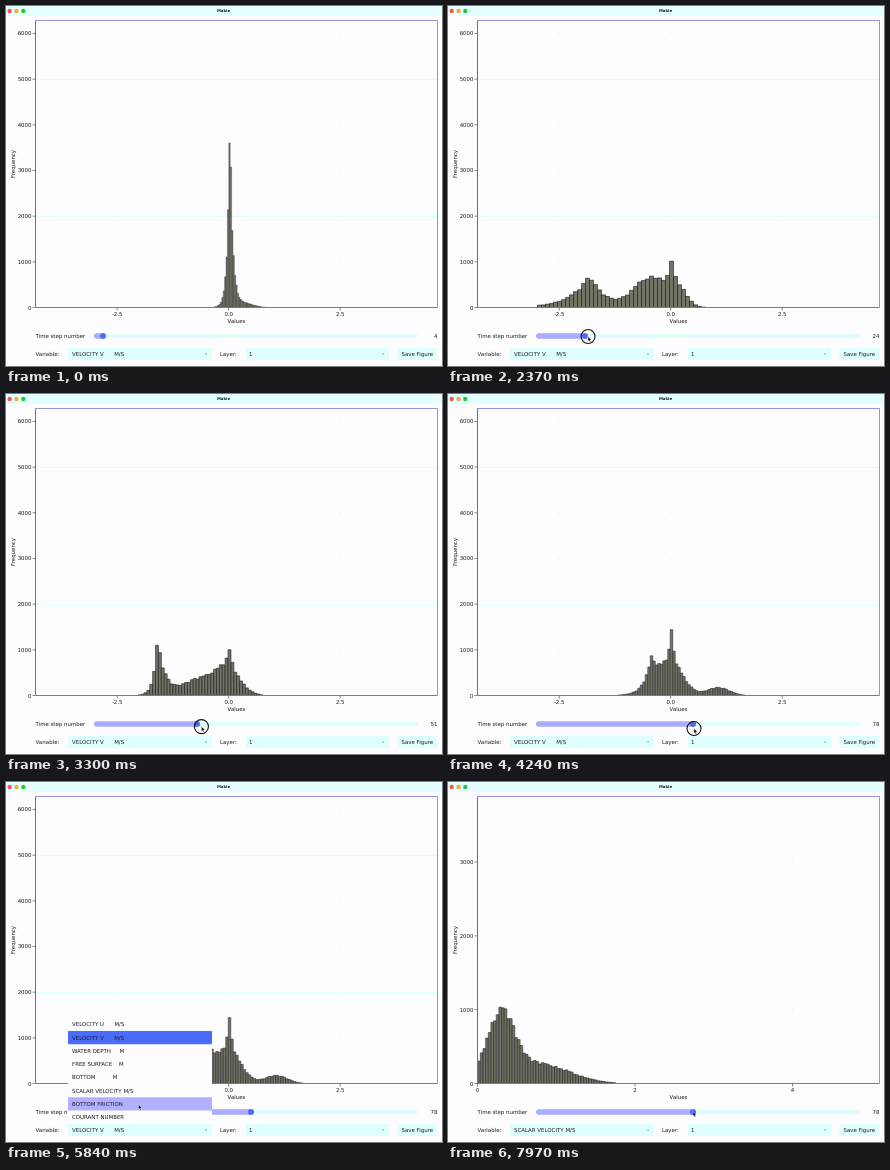
Animation of 436 by 360 pixels, one loop 8000 ms. Source, as an HTML page with a canvas:

```html
<!DOCTYPE html>
<html lang="en">
<head>
<meta charset="utf-8">
<title>Histogram viewer</title>
<style>
html, body { margin: 0; width: 100%; height: 100%; overflow: hidden; background: #fdfdff; }
canvas { display: block; }
</style>
</head>
<body>
<canvas id="stage" width="436" height="360"></canvas>
<script>
const ctx = document.getElementById('stage').getContext('2d');
const LOOP = 8000, OPEN = 4800, PICK = 6430;
const BASE = 301.5, LEFT = 29.5, RIGHT = 431.5, TOP = 14.5, ZERO = 223.5;
const LIST_TOP = 235.7, ROW = 13.25;
const PAPER = '#fdfdff', PALE = '#dfffff', INK = '#1c1c22';

// Velocity distribution: a tidal cusp (x, height, left and right width),
// a spike at zero (height, width) and two bells (x, height, width).
const tides = [
  { step: 4, bin: 1.4, tide: [224.9, 60, 3.2, 2.5], spike: [112, 2.1], near: [226, 14, 4], far: [236, 5, 10] },
  { step: 24, bin: 4, tide: [142, 32, 19, 15], spike: [18, 2], near: [203, 30, 16], far: [229, 18, 9] },
  { step: 51, bin: 2.9, tide: [151.5, 54, 4, 8], spike: [17, 2.5], near: [190, 14, 14], far: [220, 29, 13] },
  { step: 78, bin: 2.5, tide: [204, 31, 8, 7], spike: [31, 2], near: [223, 33, 12], far: [270, 8, 11] }
];

const items = [['VELOCITY U', 'M/S'], ['VELOCITY V', 'M/S'], ['WATER DEPTH', 'M'], ['FREE SURFACE', 'M'],
  ['BOTTOM', 'M'], ['SCALAR VELOCITY', 'M/S'], ['BOTTOM FRICTION', ''], ['COURANT NUMBER', '']]
  .map(([name, unit]) => name.padEnd(16) + unit);

// Cursor moves: start, end, x, y
const entry = [432, 12];
const moves = [[670, 1130, 97, 329.5], [1430, 2370, 140, 330.5], [2370, 4150, 246, 334.5],
  [4350, 4650, 203, 347.5], [5470, 5840, 132.5, 322.5], [5840, 6270, 122, 308], [6600, 7500, 245, 329.5]];
const presses = [[1430, 4350], [4700, 4860], [6350, 6490]];

const clamp = (v, lo, hi) => Math.min(hi, Math.max(lo, v));
const mix = (a, b, k) => Array.isArray(a) ? a.map((v, i) => mix(v, b[i], k)) : a + (b - a) * k;
const bell = (x, [mid, h, w]) => h * Math.exp(-(((x - mid) / w) ** 2) / 2);
const cusp = (x, [mid, h, wl, wr = wl]) => h * Math.exp(-Math.abs(x - mid) / (x < mid ? wl : wr));

const stepAt = t => Math.round(clamp(24 + (t - 2370) * 0.029, 4, 78));
const cursorAt = t => moves.reduce((at, [from, to, x, y]) =>
  mix(at, [x, y], clamp((t - from) / (to - from), 0, 1)), entry);

function rect(x, y, w, h, color, r = 0) {
  ctx.fillStyle = color;
  ctx.beginPath();
  ctx.roundRect(x, y, w, h, r);
  ctx.fill();
}

function disc(x, y, r, color) {
  ctx.fillStyle = color;
  ctx.beginPath();
  ctx.arc(x, y, r, 0, 7);
  ctx.fill();
}

function line(x1, y1, x2, y2, color, width = 1) {
  ctx.strokeStyle = color;
  ctx.lineWidth = width;
  ctx.beginPath();
  ctx.moveTo(x1, y1);
  ctx.lineTo(x2, y2);
  ctx.stroke();
}

function text(str, x, y, align = 'left', font = '5.45px') {
  ctx.font = font + ' "DejaVu Sans", sans-serif';
  ctx.textAlign = align;
  ctx.fillStyle = INK;
  ctx.fillText(str, x, y + 2);
}

function bars(height, bin, anchor, from, to) {
  ctx.fillStyle = '#737366';
  ctx.strokeStyle = '#16161c';
  ctx.lineWidth = Math.min(0.6, bin / 5);
  for (let i = Math.ceil((from - anchor) / bin); anchor + i * bin < to; i++) {
    const x = anchor + i * bin;
    const h = height(x) * (1 + 0.06 * Math.sin(i * i * 7.3));
    if (h < 0.4) continue;
    ctx.beginPath();
    ctx.rect(x - bin / 2, BASE - h, bin, h);
    ctx.fill();
    ctx.stroke();
  }
}

function velocity(step) {
  const i = Math.max(1, tides.findIndex(s => s.step >= step));
  const a = tides[i - 1], b = tides[i], k = (step - a.step) / (b.step - a.step);
  const [bin, tide, spike, near, far] = ['bin', 'tide', 'spike', 'near', 'far'].map(key => mix(a[key], b[key], k));
  bars(x => cusp(x, tide) + cusp(x, [ZERO, ...spike]) + bell(x, near) + bell(x, far), bin, ZERO, 90, 304);
}

function speed() {
  bars(x => bell(x, [52.5, 65, 14]) + bell(x, [92, 19, 30]), 2.65, 31, LEFT, 168);
}

function axes(xTicks, yTop, yScale) {
  for (let v = 0; v <= yTop; v += 1000) {
    const y = BASE - v * yScale;
    line(26.5, y, LEFT, y, '#333', 0.6);
    text(v, 25.5, y, 'right');
    if (v) for (const [x] of xTicks) if (x > LEFT) rect(x - 0.5, y - 0.5, 1, 1, '#e6e6ee');
  }
  for (const [x, label] of xTicks) {
    line(x, BASE, x, BASE + 3, '#333', 0.6);
    text(label, x, 307.6, 'center');
  }
}

function spines() {
  line(LEFT, TOP, RIGHT, TOP, '#9494d8');
  line(RIGHT, TOP, RIGHT, BASE, '#9494d0');
  line(LEFT, TOP, LEFT, BASE, '#6c6c90');
  line(LEFT, BASE, RIGHT, BASE, '#6c8090');
}

function frame() {
  rect(0, 0, 436, 10, '#e4ffff');
  ['#ff5252', '#f6ae30', '#2cc444'].forEach((c, i) => disc(3.7 + i * 6.8, 5, 2.2, c));
  text('Makie', 217.5, 3.9, 'center', 'bold 3.9px');
  text('Values', 230.5, 315, 'center');
  ctx.save();
  ctx.translate(7, 158);
  ctx.rotate(-Math.PI / 2);
  text('Frequency', 0, 0, 'center');
  ctx.restore();
}

function controls(step, chosen) {
  const x = 89 + 2 * step;
  text('Time step number', 29.5, 330);
  rect(88, 328, 324, 4, PALE, 2);
  rect(88, 327.3, x - 88, 5.4, '#ababff', 2.7);
  disc(x, 330, 3, '#4d6cf0');
  text(step, 431.5, 330, 'right');

  text('Variable:', 29.5, 348);
  rect(62, 342, 144, 12, PALE);
  text(items[chosen], 66, 348);
  text('Layer:', 214, 348);
  rect(240, 342, 143, 12, PALE);
  text('1', 243, 348);
  for (const ax of [200, 377]) rect(ax - 1, 347.6, 2, 1, '#8a9a9a');
  rect(391.5, 342, 40, 12, PALE);
  text('Save Figure', 411.3, 348, 'center');
}

function menu(cursorY) {
  const hover = Math.floor((cursorY - LIST_TOP) / ROW);
  rect(62, LIST_TOP, 144, ROW * items.length, PAPER);
  items.forEach((item, i) => {
    const y = LIST_TOP + i * ROW;
    if (i === 1) rect(62, y, 144, ROW, '#4a6cfa');
    else if (i === hover) rect(62, y, 144, ROW, '#b0b0ff');
    text(item, 66, y + ROW / 2);
  });
}

function cursor(x, y, pressed) {
  if (pressed) {
    ctx.strokeStyle = '#111';
    ctx.lineWidth = 1.1;
    ctx.beginPath();
    ctx.arc(x, y, 7, 0, 7);
    ctx.stroke();
  }
  ctx.save();
  ctx.translate(x, y);
  ctx.fillStyle = '#0a0a0a';
  ctx.strokeStyle = '#fff';
  ctx.lineWidth = 0.4;
  const arrow = new Path2D('M0 0V4.8L1.1 3.9L1.9 5.7L2.7 5.3L2 3.6L3.5 3.5Z');
  ctx.fill(arrow);
  ctx.stroke(arrow);
  ctx.restore();
}

function draw(t) {
  const step = stepAt(t), [cx, cy] = cursorAt(t), scalar = t >= PICK;

  rect(0, 0, 436, 360, PAPER);
  frame();
  if (scalar) {
    axes([[LEFT, '0'], [187, '2'], [344.5, '4']], 3000, 0.0738);
    speed();
  } else {
    for (const y of [73.5, 210.5]) line(LEFT, y, RIGHT, y, '#dcffff');
    axes([[111.2, '-2.5'], [222.7, '0.0'], [334.2, '2.5']], 6000, 0.04567);
    velocity(step);
  }
  spines();
  controls(step, scalar ? 5 : 1);
  if (t >= OPEN && !scalar) menu(cy);
  if (t >= moves[0][0]) cursor(cx, cy, presses.some(([a, b]) => t >= a && t < b));
}

function tick() {
  draw(performance.now() % LOOP);
  requestAnimationFrame(tick);
}
tick();
</script>
</body>
</html>
```
